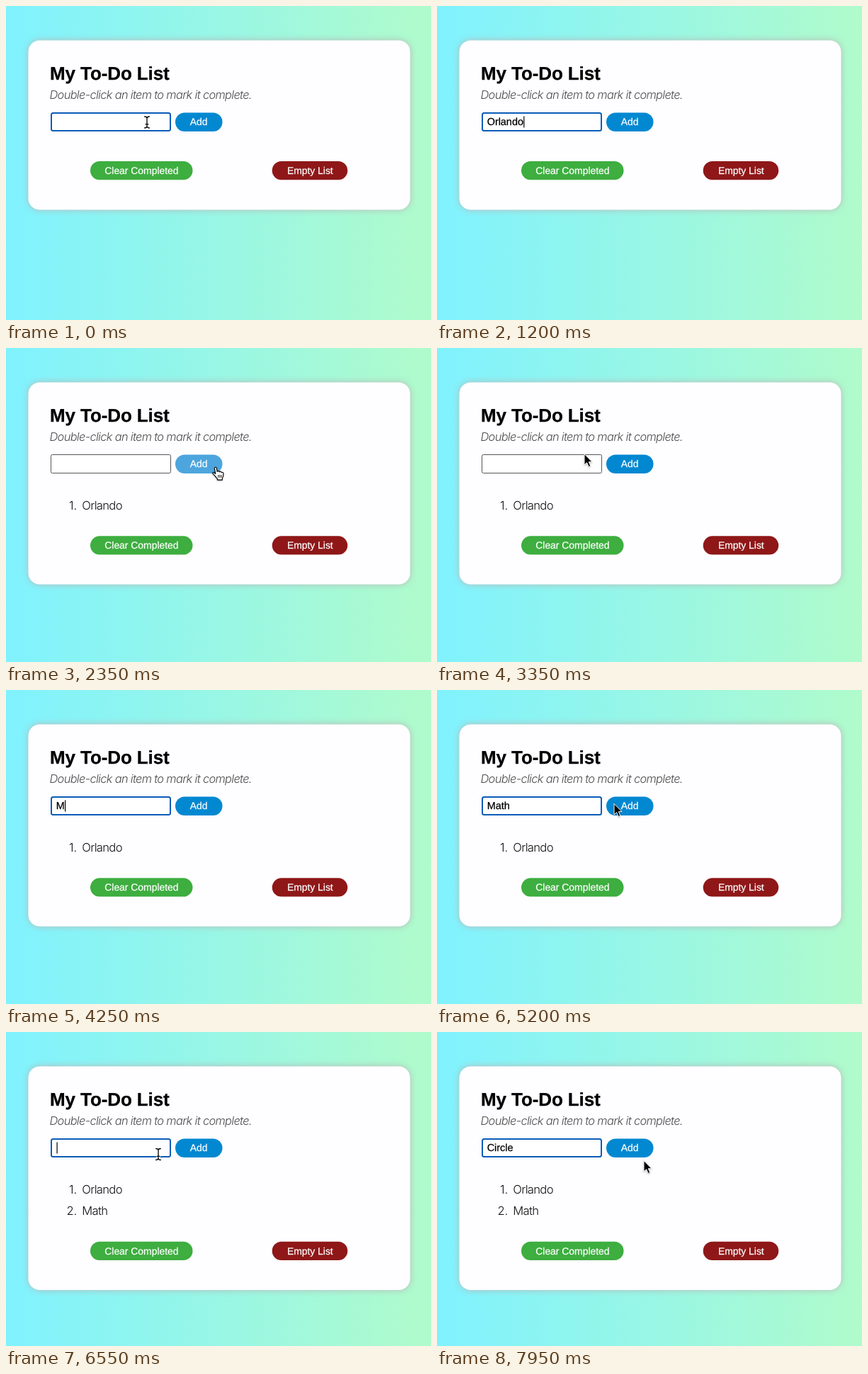
Animation, 600 px wide and 443 px high, one loop 8 s. Source, as an HTML page:

```html
<!DOCTYPE html>
<html lang="en">
<head>
<meta charset="utf-8">
<title>My To-Do List</title>
<style>
html, body { margin: 0; width: 100%; height: 100%; overflow: hidden; }
svg { display: block; width: 100vw; height: 100vh; }
text { font-family: "Liberation Sans", Arial, sans-serif; white-space: pre; text-rendering: geometricPrecision; }
.title { font-size: 26px; font-weight: 700; letter-spacing: -.1px; stroke: #000; stroke-width: .3px; }
.hint, .item { font-family: Inter, "Liberation Sans", sans-serif; font-weight: 300; }
.hint { font-size: 16.4px; font-style: italic; fill: #4c4c4c; letter-spacing: -.67px; }
.item { font-size: 16.6px; fill: #111; letter-spacing: -.68px; }
.number { letter-spacing: 0; text-anchor: end; }
.button text { font-size: 13.9px; fill: #fff; text-anchor: middle; stroke: #fff; stroke-width: .25px; }
.typed { font-size: 14.4px; stroke: #000; stroke-width: .25px; }
.card { fill: #fefdff; filter: drop-shadow(0 0 5px #b8b8b8); }
.pointer { filter: drop-shadow(0 1px 1px rgba(0, 0, 0, .3)); }
</style>
</head>
<body>
<svg viewBox="0 0 600 443" preserveAspectRatio="none">
  <defs>
    <linearGradient id="sky">
      <stop offset="0" stop-color="#80f2ff"/>
      <stop offset="1" stop-color="#b0fbcb"/>
    </linearGradient>
    <path id="stem" d="M-3.3-8Q0-8 0-5.5Q0-8 3.3-8M0-5.5V5.5M-3.3 8Q0 8 0 5.5Q0 8 3.3 8M-2 2.8H2"/>
  </defs>
  <rect width="600" height="443" fill="url(#sky)"/>
  <rect id="card" class="card" x="31.5" y="48.5" width="539" height="239" rx="16"/>
  <text class="title" x="62" y="104">My To-Do List</text>
  <text class="hint" x="61.5" y="131.2">Double-click an item to mark it complete.</text>
  <rect id="field" fill="#fff"/>
  <text id="typed" class="typed" x="70.7" y="168.3"></text>
  <rect id="caret" y="155.5" width="1.2" height="16"/>
  <g class="button">
    <rect id="add" x="239" y="150.5" width="66.5" height="26.5" rx="13.2"/>
    <text x="272.2" y="168.3">Add</text>
  </g>
  <g id="list"></g>
  <g id="footer" class="button">
    <rect x="119" y="219" width="144.5" height="26.3" rx="13.1" fill="#3dae3f"/>
    <text x="191.4" y="236.9">Clear Completed</text>
    <rect x="375.7" y="219" width="106.5" height="26.3" rx="13.1" fill="#8f1718"/>
    <text x="429.3" y="236.9">Empty List</text>
  </g>
  <g id="beam" fill="none" stroke-linecap="round">
    <use href="#stem" stroke="#fff" stroke-width="2.8"/>
    <use href="#stem" stroke="#000" stroke-width="1.3"/>
  </g>
  <path id="arrow" class="pointer" d="M0 0V15.4L3.6 12.2L6.1 18L8.8 16.9L6.3 11.2H11.1Z" fill="#000" stroke="#fff"/>
  <g id="hand" class="pointer" stroke="#000" stroke-width="1.1" stroke-linejoin="round">
    <path d="M-1.6 1.2Q-1.4-.4 0-.2Q1.1 0 1.3 1.2L2.1 6Q2.6 4.8 3.9 5.1Q4.9 5.3 5.1 6.5Q6 5 7.4 6Q8 6.4 8.1 7.2Q9 6.4 10 7Q11 7.6 10.9 9.2Q10.9 13 9.3 15.2V17.6H2.4V15.8Q.2 13.7-1.2 11.6L-3.8 9.2Q-4.8 7.8-3.6 7.2Q-2.4 6.7-.2 9Z" fill="#fff"/>
    <path d="M3.8 10.5V14.4M5.9 10.5V14.4M8 10.5V14.4" fill="none" stroke-width=".9"/>
  </g>
</svg>
<script>
const LOOP = 8000, STEP = 50, BLINK = 500;
const $ = id => document.getElementById(id);

// Each entry: word, first key, time per key, time it is added to the list
const words = [
  { text: "Orlando", start: 350, gap: 110, added: 2050 },
  { text: "Math", start: 4150, gap: 150, added: 5550 },
  { text: "Circle", start: 6850, gap: 100, added: Infinity }
];
const focusSpans = [[0, 2000], [3700, 5500], [6400, LOOP]];
const hoverSpans = [[1850, 2500], [5250, 5950]];
const cardHeights = [239, 285, 315.5];
const footerShifts = [0, 46.3, 76.7];

// Pointer path: time, x, y, shape from here on
const path = [
  [0, 199, 164, "beam"], [300, 199, 164, ""],
  [1500, 199, 164, "beam"], [1600, 201, 164, "beam"],
  [1750, 234, 163, "arrow"], [1850, 252, 163, "hand"],
  [2050, 287, 166, "hand"], [2350, 296, 168.5, "hand"],
  [2500, 298, 178, "arrow"], [2750, 291, 181, "arrow"],
  [3100, 246, 156, "arrow"], [3350, 208, 149.5, "arrow"],
  [3400, 204, 155, "beam"], [3600, 199, 164, "beam"], [4100, 199, 164, ""],
  [4850, 199, 164, "beam"], [5050, 218, 162, "beam"],
  [5150, 240, 161, "arrow"], [5200, 250, 160.5, "arrow"],
  [5250, 258, 161, "hand"], [5450, 281, 166, "hand"],
  [5800, 283, 167, "hand"], [5950, 260, 179, "arrow"],
  [6150, 228, 175, "beam"], [6350, 215, 172.5, "beam"], [6800, 215, 172.5, ""],
  [7600, 215, 172.5, "beam"], [7700, 225, 173, "arrow"],
  [7900, 288, 179, "arrow"], [7950, 292, 181.5, "arrow"], [LOOP, 292, 181.5, ""]
];

const within = (spans, t) => spans.find(([a, b]) => t >= a && t < b);
const show = (node, on) => node.setAttribute("visibility", on ? "visible" : "hidden");

function set(node, attrs) {
  for (const key in attrs) node.setAttribute(key, attrs[key]);
}

function add(parent, tag, attrs, content = "") {
  const node = document.createElementNS("http://www.w3.org/2000/svg", tag);
  set(node, attrs);
  node.textContent = content;
  parent.append(node);
  return node;
}

const rows = words.slice(0, 2).map((word, i) => {
  const row = add($("list"), "g", {});
  const y = 227.5 + i * 30.4;
  add(row, "text", { x: 100.3, y, class: "item number" }, i + 1 + ".");
  add(row, "text", { x: 107.3, y, class: "item" }, word.text);
  return row;
});

function drawPointer(t) {
  const i = path.findIndex(p => p[0] > t) - 1;
  const [t0, x0, y0, shape] = path[i], [t1, x1, y1] = path[i + 1];
  const k = (t - t0) / (t1 - t0);
  const place = `translate(${x0 + (x1 - x0) * k} ${y0 + (y1 - y0) * k})`;
  for (const id of ["beam", "arrow", "hand"]) {
    $(id).setAttribute("transform", place);
    show($(id), id === shape);
  }
}

function drawField(t) {
  const focus = within(focusSpans, t);
  set($("field"), focus
    ? { x: 64, y: 151, width: 168, height: 25, rx: 2.5, stroke: "#0b5cb8", "stroke-width": 2 }
    : { x: 63.5, y: 150.5, width: 169, height: 26, rx: 2, stroke: "#555", "stroke-width": 1 });

  const word = words.find(w => t >= w.start && t < w.added);
  const count = word ? Math.min(word.text.length, Math.floor((t - word.start) / word.gap) + 1) : 0;
  const typed = $("typed");
  typed.textContent = word ? word.text.slice(0, count) : "";

  const lastKey = word ? word.start + (count - 1) * word.gap : focus && focus[0];
  const lit = focus && Math.floor((t - lastKey) / BLINK) % 2 === 0;
  show($("caret"), lit && (word || t > BLINK));
  $("caret").setAttribute("x", 71 + (count ? typed.getComputedTextLength() : .5));
}

function draw(t) {
  const count = words.filter(w => t >= w.added).length;
  $("card").setAttribute("height", cardHeights[count]);
  $("footer").setAttribute("transform", `translate(0 ${footerShifts[count]})`);
  rows.forEach((row, i) => show(row, i < count));
  $("add").setAttribute("fill", within(hoverSpans, t) ? "#4da5dd" : "#0288d1");
  drawField(t);
  drawPointer(t);
}

const begin = performance.now();
function tick() {
  const t = (performance.now() - begin) % LOOP;
  draw(Math.floor(t / STEP) * STEP);
  requestAnimationFrame(tick);
}
tick();
</script>
</body>
</html>
```
